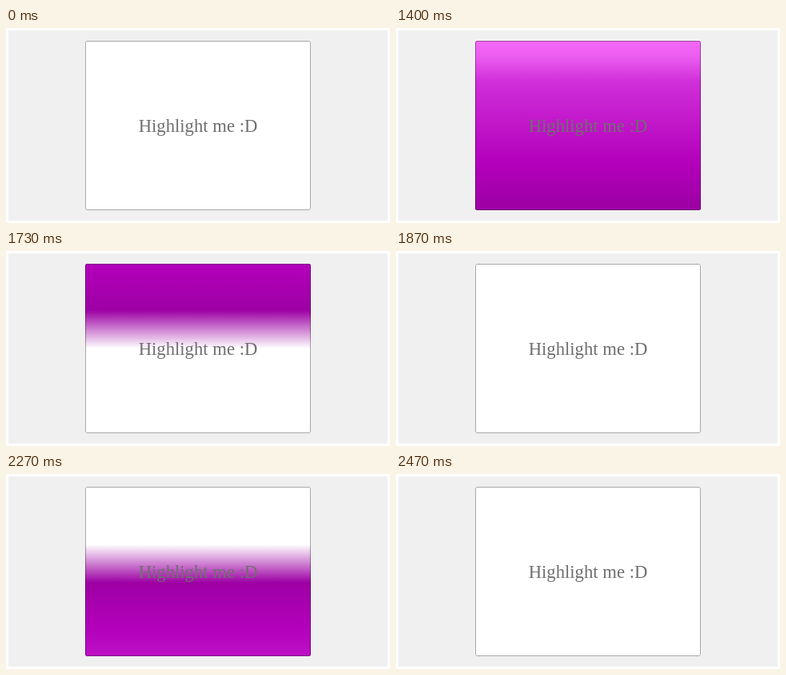
Write an HTML page that moves like this. It is 480 px wide and 244 px high and loops after 2540 ms.

```html
<!DOCTYPE html>
<html lang="en">
<head>
<meta charset="utf-8">
<title>Highlight me</title>
<style>
  html, body {
    margin: 0;
    width: 100%;
    height: 100%;
    overflow: hidden;
    background: #fff;
  }
  .stage {
    position: absolute;
    inset: 0;
    width: 480px;
    height: 244px;
    overflow: hidden;
  }
  .panel {
    position: absolute;
    left: 3px;
    top: 3px;
    width: 474px;
    height: 238px;
    background: #f0f0f0;
  }
  .box {
    position: absolute;
    left: 99px;
    top: 16px;
    width: 282px;
    height: 212px;
    overflow: hidden;
    border-radius: 2.5px;
    background: #fff;
  }
  .box::after {
    content: "";
    position: absolute;
    inset: 0;
    border: 1px solid rgba(0, 0, 0, .34);
    border-radius: inherit;
    box-sizing: border-box;
  }
  .layer {
    position: absolute;
    inset: 0;
    animation: flip 2540ms step-end infinite;
  }
  .sheet {
    height: 270px;
    background: linear-gradient(#fff 0, #9d00a4 48px, #b300bb 104px,
      #d02fd9 206px, #ec5df0 238px, #f46af8 258px);
    animation: sweep 2540ms step-end infinite;
  }
  svg {
    position: absolute;
    inset: 0;
  }
  text {
    font: 22.7px "Liberation Serif", "Times New Roman", serif;
    fill: #6f6f6f;
  }

  /* The sheet leaves upwards first, then downwards. */
  @keyframes flip {
    0% { transform: scaleY(-1); }
    78%, 100% { transform: none; }
  }
  @keyframes sweep {
    0% { transform: translateY(214px); }
    55.11% { transform: translateY(-45px); animation-timing-function: steps(2); }
    60.23% { transform: translateY(4px); animation-timing-function: steps(3); }
    68.11% { transform: translateY(106px); }
    70.86% { transform: translateY(144px); }
    73.62% { transform: translateY(214px); }
    83.85% { transform: translateY(4px); animation-timing-function: steps(3); }
    91.73% { transform: translateY(106px); }
    94.48% { transform: translateY(144px); }
    97.24%, 100% { transform: translateY(214px); }
  }
</style>
</head>
<body>
<div class="stage">
  <div class="panel"></div>
  <div class="box">
    <div class="layer"><div class="sheet"></div></div>
  </div>
  <svg width="480" height="244"><text x="240" y="129.5" text-anchor="middle">Highlight me :D</text></svg>
</div>
</body>
</html>
```
